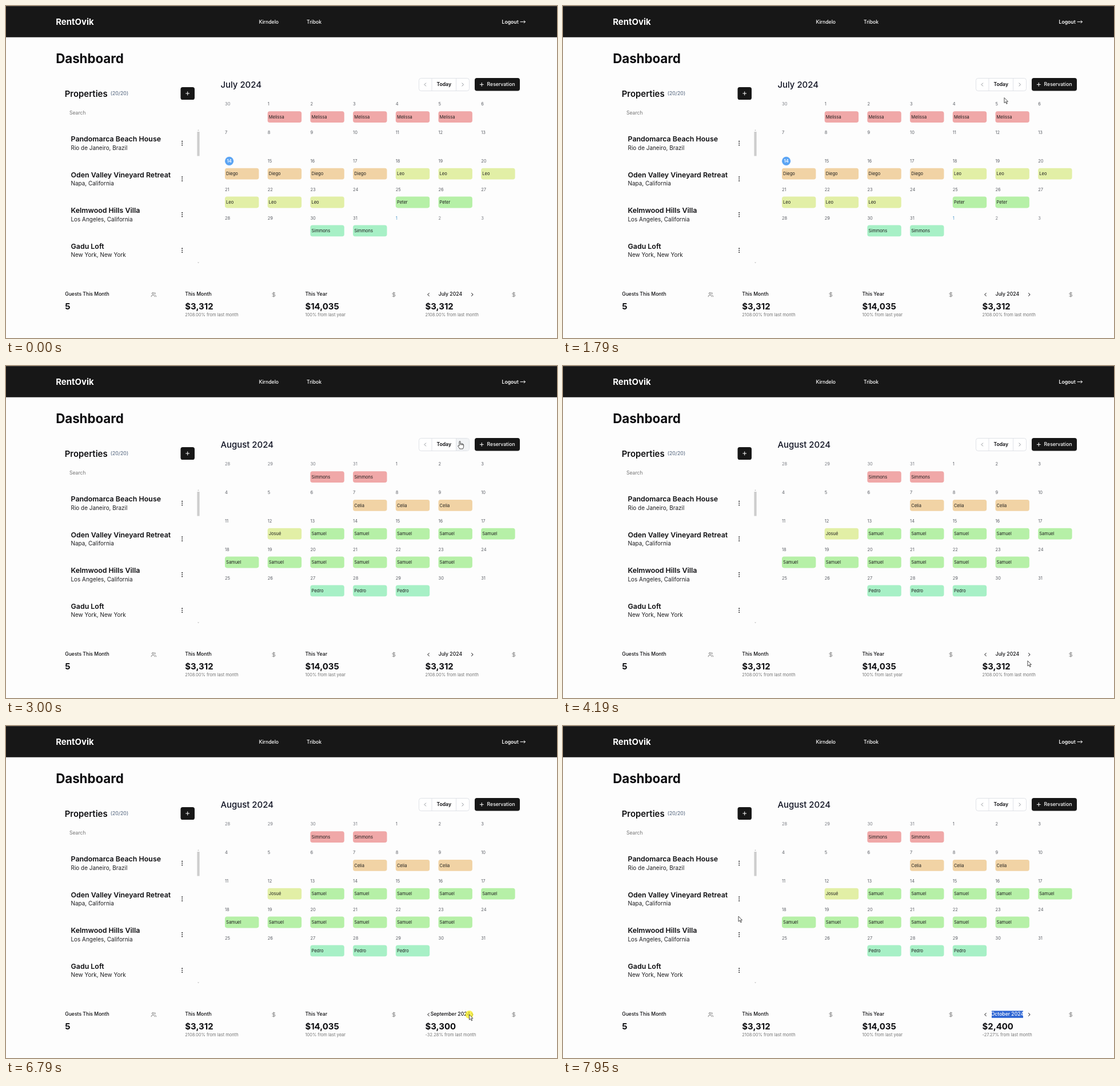
These frames come from a looping animation (964x581 px, 8000 ms). An HTML page:

```html
<!DOCTYPE html>
<html lang="en">
<head>
<meta charset="utf-8">
<title>Dashboard</title>
<style>
  html, body { margin: 0; width: 100%; height: 100%; overflow: hidden; background: #fdfdfd; }
  svg { display: block; width: 964px; height: 581px; }
  text { font-family: Inter, sans-serif; white-space: pre; }
</style>
</head>
<body>
<svg id="stage" viewBox="0 0 964 581" xmlns="http://www.w3.org/2000/svg">
  <g id="page"></g>
  <g id="calendar"></g>
  <g id="revenue"></g>
  <circle id="click" r="7" fill="#f5ec2e" fill-opacity=".8"/>
  <g id="cursor">
    <path id="arrow" d="M0 0V9.2L2.2 7.2L3.9 10.8L5.3 10.2L3.7 6.7H6.5Z" fill="#fff" stroke="#222" stroke-width=".8"/>
    <path id="hand" d="M-1 0.2Q0 -1 1 .2V4.2Q2.2 3.4 3 4.6Q4.2 3.9 4.9 5Q6.4 4.4 6.6 6V9.2Q6.4 11 5.2 13H-.2Q-1.4 10.6 -3.4 8.3Q-3.4 6.6 -1 7.8Z M1 4.2V6.4 M3 4.6V6.6 M4.9 5V6.8" fill="#fff" stroke="#222" stroke-width=".8"/>
    <path id="beam" d="M-2.5 -5H-.6L0 -4.4L.6 -5H2.5 M0 -4.4V4.4 M-2.5 5H-.6L0 4.4L.6 5H2.5" fill="none" stroke="#222" stroke-width=".9"/>
  </g>
</svg>
<script>
const $ = id => document.getElementById(id);
const LOOP = 8000;
const INK = '#0c0c0f', GRAY = '#737373', BLACK = '#171717';
const XS = 7.5, SM = 8.65, BASE = 9.95, XL = 12.4, XXL = 14.95;

// y is the middle of the capitals
const text = (x, y, str, size, weight = 400, fill = INK, extra = '') =>
  `<text x="${x}" y="${(y + size * .363).toFixed(2)}" font-size="${size}" font-weight="${weight}" fill="${fill}" ${extra}>${str}</text>`;
const rect = (x, y, w, h, r, fill, extra = '') =>
  `<rect x="${x}" y="${y}" width="${w}" height="${h}" rx="${r}" fill="${fill}" ${extra}/>`;
const line = (d, color, width = 1) =>
  `<path d="${d}" fill="none" stroke="${color}" stroke-width="${width}" stroke-linecap="round" stroke-linejoin="round"/>`;
const plus = (x, y, r) => line(`M${x - r} ${y}H${x + r}M${x} ${y - r}V${y + r}`, '#fff');
const chevron = (x, y, dir, color) =>
  line(`M${x - 1.3 * dir} ${y - 2.6}L${x + 1.3 * dir} ${y}L${x - 1.3 * dir} ${y + 2.6}`, color);
const icon = (x, y, d) =>
  `<g transform="translate(${x - 5} ${y - 5}) scale(.417)">${line(d, GRAY, 2)}</g>`;

const USERS = 'M16 21v-2a4 4 0 0 0-4-4H6a4 4 0 0 0-4 4v2M5 7a4 4 0 1 0 8 0a4 4 0 1 0-8 0M22 21v-2a4 4 0 0 0-3-3.87M16 3.13a4 4 0 0 1 0 7.75';
const DOLLAR = 'M12 2v20M17 5H9.5a3.5 3.5 0 0 0 0 7h5a3.5 3.5 0 0 1 0 7H6';

const properties = [
  ['Pandomarca Beach House', 'Rio de Janeiro, Brazil'],
  ['Oden Valley Vineyard Retreat', 'Napa, California'],
  ['Kelmwood Hills Villa', 'Los Angeles, California'],
  ['Gadu Loft', 'New York, New York']
];
const stats = [
  ['Guests This Month', '5', ''],
  ['This Month', '$3,312', '2108.00% from last month'],
  ['This Year', '$14,035', '100% from last year']
];
const revenue = [
  ['July 2024', '$3,312', '2108.00% from last month'],
  ['August 2024', '$4,873', '47.13% from last month'],
  ['September 2024', '$3,300', '-32.28% from last month'],
  ['October 2024', '$2,400', '-27.27% from last month']
];

// bookings: first cell, nights, guest
const months = [
  { title: 'July 2024', lead: 1, prev: 30, today: 14,
    stays: [[1, 5, 'Melissa'], [14, 4, 'Diego'], [18, 6, 'Leo'], [25, 2, 'Peter'], [30, 2, 'Simmons']] },
  { title: 'August 2024', lead: 4, prev: 31,
    stays: [[2, 2, 'Simmons'], [10, 3, 'Celia'], [15, 1, 'Josué'], [16, 11, 'Samuel'], [30, 3, 'Pedro']] }
];
const stayColors = ['#f0a8a8', '#f1d3a5', '#e2efa6', '#b6f0a7', '#a7f0c6'];

const statX = i => +(103.2 + 210.1 * i).toFixed(1);
const cellX = i => +(383 + 74.7 * (i % 7)).toFixed(1);
const cellY = i => +(171.7 + 49.8 * Math.floor(i / 7)).toFixed(1);

function statBody(i, value, note) {
  return text(statX(i), 525.5, value, XXL, 700) + text(statX(i), 540.3, note, XS, 400, GRAY);
}

function drawPage() {
  let s = rect(0, 0, 964, 54.7, 0, BLACK) + rect(0, 0, 964, 1, 0, '#3d3d3d');
  s += text(87.2, 28, 'RentOvik', XXL, 700, '#fff');
  s += text(442.4, 27.5, 'Kirndelo', SM, 500, '#fff') + text(526, 27.5, 'Tribok', SM, 500, '#fff');
  s += text(867.6, 27.5, 'Logout', SM, 600, '#fff') + line('M900 27.7H908.4M906.2 25.5L908.4 27.7L906.2 29.9', '#fff');
  s += text(87.2, 91.5, 'Dashboard', 22.4, 700, INK, 'letter-spacing="-.1"');

  s += text(102.7, 153.3, 'Properties', XXL, 600) + text(182.8, 153.2, '(20/20)', SM, 500, '#64748b');
  s += rect(305.5, 142, 24.5, 22, 3.6, BLACK) + plus(317.7, 153, 3);
  s += text(110.9, 186.5, 'Search', SM, 400, GRAY);
  s += '<rect id="hover" x="104" y="275.5" width="224" height="52" rx="4" fill="#fafafa"/>';
  properties.forEach(([name, place], i) => {
    const y = 232.5 + 62.5 * i;
    s += text(113.5, y, name, XL, 600) + text(113.5, y + 15.8, place, BASE, 400, '#1c1c1f');
    for (const d of [-3.3, 0, 3.3]) s += `<circle cx="308.2" cy="${y + 7.6 + d}" r=".95" fill="${INK}"/>`;
  });
  s += rect(334.4, 220, 4.2, 42.5, 0, '#cdcdcd');
  s += '<path d="M335 218L336.5 216.4L338 218ZM335 448.4L336.5 450L338 448.4Z" fill="#b5b5b5"/>';

  s += rect(722.5, 126.5, 88, 22, 3.8, '#fff', 'stroke="#dfe2e7"');
  s += '<path id="next" d="M788 127H806.7Q810 127 810 130.3V144.7Q810 148 806.7 148H788Z" fill="#f1f3f5"/>';
  s += line('M745 126.5V148.5M787.5 126.5V148.5', '#dfe2e7');
  s += chevron(733.3, 137.5, -1, '#8b8f96') + chevron(799.2, 137.5, 1, '#8b8f96');
  s += text(766.2, 137.3, 'Today', SM, 600, INK, 'text-anchor="middle"');
  s += rect(820, 126, 79, 22.6, 3.8, BLACK) + plus(832.3, 137.4, 3);
  s += text(841.6, 137.3, 'Reservation', SM, 500, '#fff');

  stats.forEach(([label, value, note], i) => {
    s += text(statX(i), 504.3, label, SM, 500) + statBody(i, value, note);
    s += icon(258.4 + 210.1 * i, 505, i ? DOLLAR : USERS);
  });
  s += icon(888.4, 505, DOLLAR) + chevron(739, 505, -1, INK) + chevron(815.8, 505, 1, INK);
  $('page').innerHTML = s;
}

function calendarMarkup({ title, lead, prev, today, stays }) {
  let s = text(375.4, 138, title, XXL, 500, '#0f1222');
  for (let i = 0; i < 35; i++) {
    let day = i - lead + 1, fill = '#5c5f66';
    if (day < 1) { day += prev; fill = '#787b82'; }
    else if (day > 31) { day -= 31; fill = day === 1 ? '#4a97cc' : '#787b82'; }
    const x = cellX(i), y = cellY(i);
    if (day === today && i >= lead) {
      s += `<circle cx="390.6" cy="${y}" r="7.6" fill="#5ca5f4"/>`;
      s += text(390.6, y, day, XS, 600, '#fff', 'text-anchor="middle"');
    } else s += text(x, y, day, XS, 400, fill);
  }
  stays.forEach(([first, nights, guest], k) => {
    for (let i = first; i < first + nights; i++) {
      const x = cellX(i), y = cellY(i);
      s += rect(x, +(y + 12.5).toFixed(1), 59.4, 19.8, 3.8, stayColors[k]) + text(x + 2.1, y + 22.3, guest, XS, 400, '#1c1c1c');
    }
  });
  return s;
}

function revenueMarkup(index, selected) {
  const [label, value, note] = revenue[index];
  return (selected ? rect(750, 498.4, 55, 12.4, 0, '#2f66d3') : '') +
    text(777.4, 504.3, label, SM, 500, selected ? '#fff' : INK, 'text-anchor="middle"') + statBody(3, value, note);
}

// pointer moves: start, end, steps, path points as [progress, x, y]
const moves = [
  [650, 1390, 12, [[0, 385, 570], [.4, 455, 450], [.75, 580, 300], [1, 637, 233]]],
  [1460, 2060, 10, [[0, 637, 233], [.3, 710, 198], [.6, 772, 160.5], [1, 794, 132]]],
  [3590, 4390, 13, [[0, 794, 132], [.15, 781, 170], [.35, 753, 290], [.55, 775, 430], [.77, 813, 516], [1, 816, 508]]],
  [5650, 6390, 11, [[0, 816, 508], [.09, 811, 506], [.27, 558, 427], [.5, 300, 302], [.7, 510, 395], [.86, 745, 490], [1, 846, 518]]],
  [6470, 7260, 13, [[0, 846, 518], [.25, 822, 508], [.46, 810.5, 505], [1, 810.5, 505]]],
  [7400, 7950, 9, [[0, 810.5, 505], [.35, 647, 419], [.75, 318, 304], [1, 307, 333]]]
];
const clicks = [[2860, 3000], [4460, 4590], [5180, 5250], [6720, 6860], [7060, 7200]];

function along(points, u) {
  let i = 0;
  while (i < points.length - 2 && u > points[i + 1][0]) i++;
  const b = points[i], c = points[i + 1], a = points[i - 1] || b, d = points[i + 2] || c;
  const h = c[0] - b[0], v = (u - b[0]) / h;
  return [1, 2].map(k => {
    const m0 = (c[k] - a[k]) / (c[0] - a[0]) * h, m1 = (d[k] - b[k]) / (d[0] - b[0]) * h;
    return b[k] + v * (m0 + v * (3 * (c[k] - b[k]) - 2 * m0 - m1 + v * (m0 + m1 - 2 * (c[k] - b[k]))));
  });
}

function pointer(t) {
  const move = moves.filter(m => t >= m[0]).pop();
  if (!move) return null;
  const [from, to, steps, points] = move;
  const step = Math.floor((t - from) / (to - from) * (steps - 1) + .2) + 1;
  return along(points, Math.min(1, step / steps));
}

const inside = ([x, y], l, t, r, b) => x >= l && x <= r && y >= t && y <= b;
const show = (id, on) => $(id).setAttribute('visibility', on ? 'visible' : 'hidden');
const place = (id, [x, y]) => $(id).setAttribute('transform', `translate(${x.toFixed(2)} ${y.toFixed(2)})`);
const last = {};
function fill(id, key, markup) {
  if (last[id] === key) return;
  last[id] = key;
  $(id).innerHTML = markup();
}

function render(t) {
  const month = t < 3000 ? 0 : 1;
  const index = [4530, 5250, 6930].filter(at => t >= at).length;
  const selected = t >= 7130;
  fill('calendar', month, () => calendarMarkup(months[month]));
  fill('revenue', index + ':' + selected, () => revenueMarkup(index, selected));

  const p = pointer(t), at = p || [-50, -50];
  const hand = inside(at, 722, 126, 811, 149) || (t < 6400 && inside(at, 813.5, 499, 820, 511));
  const beam = t < 6400 && inside(at, 744, 498, 813, 512);
  place('cursor', at);
  place('click', at);
  show('arrow', p && !hand && !beam);
  show('hand', hand);
  show('beam', beam);
  show('click', clicks.some(([a, b]) => t >= a && t < b));
  show('next', inside(at, 788, 126, 811, 149));
  show('hover', inside(at, 104, 275, 328, 328));
}

drawPage();
const begin = performance.now();
function tick() {
  render((performance.now() - begin) % LOOP);
  requestAnimationFrame(tick);
}
render(0);
requestAnimationFrame(tick);
</script>
</body>
</html>
```
